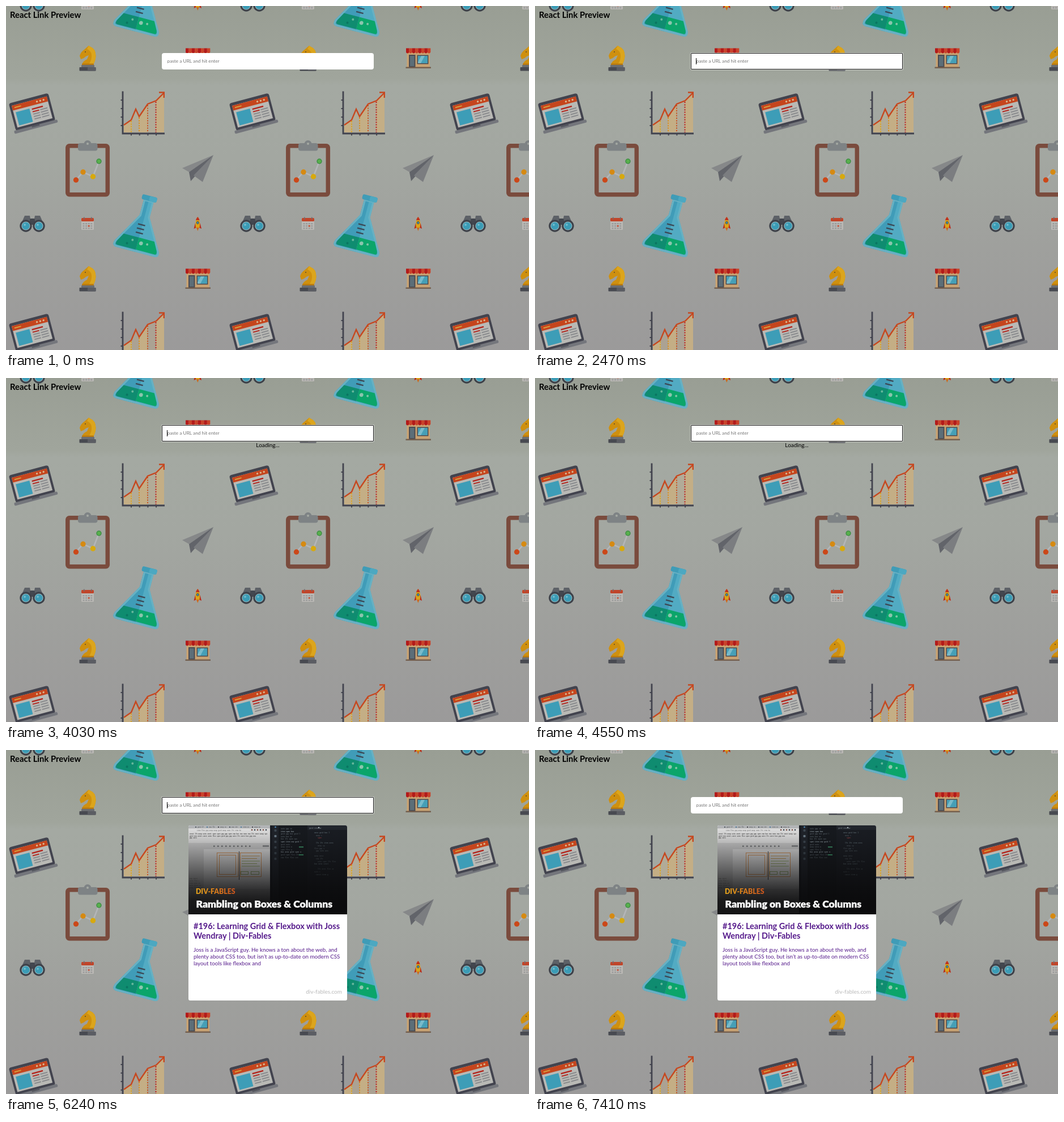
An HTML page with a canvas that plays this animation: 923 by 607 pixels, repeating every 7540 ms.

```html
<!DOCTYPE html>
<html lang="en">
<head>
<meta charset="utf-8">
<title>React Link Preview</title>
<style>
  html, body { margin: 0; width: 100%; height: 100%; overflow: hidden; }
  body { position: relative; background: #a0a49d; font: 10px/1.2 Lato, "Open Sans", sans-serif; color: #000; }
  body *, canvas { position: absolute; margin: 0; white-space: pre; }
  #wall { left: 0; top: 0; }
  h1 { left: 7px; top: 6.5px; font-size: 14.8px; font-weight: 700; }
  #field { left: 275px; top: 83px; width: 374px; height: 29px; background: #fff; border-radius: 4px; }
  #field.focus { border-radius: 1px; outline: 1px solid #161616; outline-offset: -1px; box-shadow: 0 0 0 1px rgba(255, 255, 255, .5); }
  #field span { left: 9.5px; top: 9.9px; font-size: 8.3px; }
  #field.empty span { color: #757575; }
  #caret { top: 9px; width: 1px; height: 11px; background: #000; }
  #loading { left: 275px; width: 374px; top: 111.8px; text-align: center; }
  #card { left: 322px; top: 133px; width: 280px; height: 308.5px; background: #fff; border-radius: 3px; overflow: hidden; }
  #card canvas { left: 0; top: 0; }
  .brand { left: 13px; top: 110px; font-size: 12.3px; font-weight: 900; color: transparent;
    background: linear-gradient(90deg, #e2a21b, #c9531d); -webkit-background-clip: text; background-clip: text; }
  .show { left: 13.5px; top: 127.8px; font-size: 17.6px; font-weight: 900; color: #fff; -webkit-text-stroke: .4px #fff; }
  h2 { left: 9px; top: 168.7px; font-size: 14.5px; line-height: 17.6px; font-weight: 700; color: #551a8b; }
  p { left: 9px; top: 212.7px; font-size: 9.75px; line-height: 12px; color: #551a8b; }
  .site { right: 9px; top: 287.3px; color: #b9b9b9; }
</style>
</head>
<body>
<canvas id="wall" width="923" height="607"></canvas>
<h1>React Link Preview</h1>
<div id="field"><span id="value"></span><i id="caret"></i></div>
<div id="loading">Loading...</div>
<div id="card">
  <canvas id="thumb" width="280" height="157"></canvas>
  <div class="brand">DIV-FABLES</div>
  <div class="show">Rambling on Boxes &amp; Columns</div>
  <h2>#196: Learning Grid &amp; Flexbox with Joss
Wendray | Div-Fables</h2>
  <p>Joss is a JavaScript guy. He knows a ton about the web, and
plenty about CSS too, but isn’t as up-to-date on modern CSS
layout tools like flexbox and</p>
  <div class="site">div-fables.com</div>
</div>
<script>
const $ = id => document.getElementById(id);
const TILE = 389;
let c = $('wall').getContext('2d');

// drawing helpers
function rect(x, y, w, h, color, r = 0) {
  c.fillStyle = color;
  c.beginPath();
  c.roundRect(x, y, w, h, r);
  c.fill();
}
function dot(x, y, r, color) {
  c.fillStyle = color;
  c.beginPath();
  c.arc(x, y, r, 0, Math.PI * 2);
  c.fill();
}
function trace(pts) {
  c.beginPath();
  pts.forEach(([x, y]) => c.lineTo(x, y));
}
function poly(color, ...pts) {
  trace(pts);
  c.fillStyle = color;
  c.fill();
}
function line(color, width, ...pts) {
  trace(pts);
  c.strokeStyle = color;
  c.lineWidth = width;
  c.stroke();
}
function shape(d, color) {
  c.fillStyle = color;
  c.fill(new Path2D(d));
}
function turned(x, y, angle, draw) {
  c.save();
  c.translate(x, y);
  c.rotate(angle);
  draw();
  c.restore();
}

function laptop() {
  turned(46, 187, -0.26, () => {
    rect(-36, -25, 72, 50, '#42434e', 4);
    rect(-39.5, 24, 79, 5.5, '#74767c', 2);
    rect(-7, 24, 14, 2.5, '#54565e');
    rect(-32, -20, 64, 40, '#b9b9b5');
    rect(-32, -20, 64, 9, '#c5451d');
    for (let i = 0; i < 3; i++) dot(13 + i * 6, -15.5, 1.7, '#d8b48c');
    rect(-28, -16.5, 12, 2, '#d8a03c');
    rect(-28, -7, 25, 24, '#3d9db7');
    rect(1, -6, 20, 2.4, '#b32018');
    for (let i = 0; i < 4; i++) {
      rect(1, -1 + i * 4.4, 12, 1.8, i ? '#85878a' : '#b32018');
      rect(15, -1 + i * 4.4, 13, 1.8, '#85878a');
    }
  });
}

function chart() {
  const pts = [[208, 210], [221, 201], [229, 182], [235, 195], [250, 173], [265, 167], [279, 153]];
  c.save();
  trace([...pts, [279, 223], [208, 223]]);
  c.clip();
  rect(208, 150, 72, 74, 'rgba(208,178,128,.3)');
  for (const x of [208, 235, 265]) rect(x, 150, 14, 74, '#c4ae85');
  c.restore();
  c.setLineDash([2, 2.4]);
  [[221, 203, '#d6a31c'], [235, 197, '#d78b1c'], [250, 175, '#cc511c'], [264.5, 169, '#bd1717']]
    .forEach(([x, y, color]) => line(color, 2, [x, y], [x, 223]));
  c.setLineDash([]);
  for (let i = 0; i < 4; i++) {
    rect(202.5, 165 + i * 15, 3, 2, '#42434e');
    rect(220 + i * 14.7, 225, 2, 3.5, '#42434e');
  }
  line('#42434e', 2.8, [206, 150.5], [206, 225], [280, 225]);
  line('#c6471f', 2.4, ...pts);
  line('#c6471f', 2.4, [270, 152.5], [278.8, 152.5], [278.8, 162]);
}

function clipboard() {
  c.strokeStyle = '#7a4b3d';
  c.lineWidth = 7.5;
  c.beginPath();
  c.roundRect(108.8, 246.8, 70.5, 86, 3);
  c.stroke();
  dot(144, 243.5, 6.5, '#7e8385');
  rect(127, 242, 34.5, 13.5, '#7e8385', 4);
  dot(144, 243, 2, '#a4a9a2');
  const pts = [[123.5, 307], [136, 293], [153.5, 301], [164, 274]];
  line('#b4b6b8', 2.6, ...pts);
  ['#cb4819', '#d68a12', '#d7a90e', '#3f8f45'].forEach((color, i) => dot(...pts[i], 4.7, color));
  dot(164, 274, 3.2, '#58b04c');
}

function plane() {
  const tip = [366, 263];
  poly('#868889', tip, [311, 286], [323, 293]);
  poly('#62646a', tip, [323, 293], [326, 309]);
  poly('#4f5158', tip, [326, 309], [334, 300]);
  poly('#7b7d80', tip, [331, 299], [347, 310.5]);
}

function flask() {
  turned(253, 340, 0.26, () => {
    const body = new Path2D('M-9 3V32L-40 86Q-44 97-34 97H34Q44 97 40 86L9 32V3Z');
    c.save();
    c.clip(body);
    rect(-45, 0, 90, 100, '#52abc3');
    rect(-45, 0, 45, 100, '#409cb8');
    c.strokeStyle = '#68b1c3';
    c.lineWidth = 6;
    c.stroke(body);
    c.restore();
    shape('M-28 71H0V93H-34Q-39 93-36 86Z', '#0f8c70');
    shape('M28 71H0V93H34Q39 93 36 86Z', '#0ba56a');
    rect(-13.5, -5, 27, 9, '#3f9cb7', 3);
    rect(0, -5, 13.5, 9, '#4ca8c1', 3);
    for (let i = 0; i < 3; i++) line('#3c4855', 2.4, [-8, 48 + i * 7.5], [5, 48 + i * 7.5]);
    dot(6, 80, 3.4, '#8bc5ae');
    dot(-10, 78, 2, '#67b79c');
    dot(17, 79, 2, '#7fc3a5');
    dot(-18, 86, 2, '#0a7562');
  });
}

function binoculars() {
  poly('#5d6167', [33, 370], [42, 370], [45, 386], [26, 386]);
  poly('#5d6167', [51, 370], [60, 370], [67, 386], [48, 386]);
  rect(42, 375, 9, 11, '#43474f', 2);
  for (const x of [35, 58]) {
    dot(x, 388, 10.7, '#3d4149');
    dot(x, 388, 7.6, '#9dbcc2');
    dot(x, 388, 6.6, '#3b9cb6');
    dot(x - 2, 386, 2, '#6fb9ca');
  }
}

function calendar() {
  rect(133, 374, 22, 21, '#bab8b4', 1.5);
  rect(133, 374, 22, 6, '#c0452a', 1.5);
  for (const x of [137, 150]) rect(x, 372.5, 1.5, 4, '#6c6e73');
  for (let i = 0; i < 12; i++)
    rect(135.5 + i % 4 * 4.6, 383 + (i >> 2) * 4, 3, 2.4, i === 6 ? '#c0452a' : '#999a9a');
}

function rocket() {
  poly('#b92a18', [334, 383], [331.5, 393], [336, 391]);
  poly('#b92a18', [342.5, 383], [345, 393], [340.5, 391]);
  shape('M338.3 372Q344 380 341.5 391H335Q332.5 380 338.3 372Z', '#d8a31b');
  shape('M338.3 372Q341 375 341.6 378H335Q335.5 375 338.3 372Z', '#c2331a');
  dot(338.3, 382.5, 2.4, '#42434e');
  dot(338.3, 382.5, 1.5, '#3d9db7');
  poly('#cf6a18', [336, 391], [340.7, 391], [338.3, 397]);
}

function knight() {
  shape('M134 492Q136 486 143 483L146 476Q141 477 137 481L132 483L130 477Q132 470 138 466L146 459L149 461Q158 464 158.5 477Q158 486 154 492Z', '#cf900f');
  shape('M146 459L149 461Q158 464 158.5 477Q158 486 154 492H146Q152 484 151 475Q150 468 143 465Z', '#dca51c');
  dot(140, 470, 1, '#5b4a28');
  rect(134, 490.5, 21, 3, '#b9790f', 1);
  rect(133, 493, 23, 5, '#6b6d71', 1);
  rect(129.5, 497, 29, 6.5, '#484a51', 1);
  rect(144, 497, 14.5, 6.5, '#5b5d63', 1);
}

function shop() {
  rect(318.5, 470, 40.5, 28, '#c8a272');
  rect(322, 475, 11.5, 22, '#4b4a50');
  rect(324, 477, 7.5, 18, '#5c6e78');
  rect(336.5, 475.5, 20, 16, '#4b4a50');
  rect(338, 477, 17, 13, '#469fb6');
  poly('#79bbca', [344, 477], [350, 477], [343, 490], [338, 490], [338, 488]);
  rect(316.5, 496.5, 44.5, 2.5, '#75604f');
  for (let i = 0; i < 8; i++) {
    const color = i % 2 ? '#c9432a' : '#b31a1a';
    rect(317 + i * 5.4, 463.5, 5.5, 6.5, color);
    dot(319.7 + i * 5.4, 469.8, 2.7, color);
  }
}

function drawWall() {
  const bg = c.createLinearGradient(0, 0, 0, 607);
  [[0, '#999e94'], [.21, '#a0a59c'], [.23, '#a4a9a2'], [.45, '#a3a7a1'], [.7, '#9fa09d'], [1, '#9b9a9a']]
    .forEach(stop => bg.addColorStop(...stop));
  rect(0, 0, 923, 607, bg);
  const icons = [laptop, chart, clipboard, plane, flask, binoculars, calendar, rocket, knight, shop];
  for (let row = -1; row < 2; row++)
    for (let col = 0; col < 3; col++) {
      c.save();
      c.translate(col * TILE, row * TILE);
      icons.forEach(draw => draw());
      c.restore();
    }
}

let seed = 7;
const rand = () => (seed = seed * 16807 % 2147483647) / 2147483647;
const words = 'grid box flex row gap area const auto wrap item span 1fr'.split(' ');

function tiny(x, y, count, color, size = 2.6) {
  c.font = size + 'px "Noto Sans Mono", monospace';
  c.fillStyle = color;
  let text = '';
  while (text.length < count) text += words[rand() * words.length | 0] + ' ';
  c.fillText(text.slice(0, count), x, y);
}

function drawThumb() {
  c = $('thumb').getContext('2d');
  c.translate(-322, -133);
  // browser window
  rect(322, 133, 144, 157, '#cfcfcf');
  rect(322, 133, 144, 5.5, '#b4b6b8');
  for (let i = 0; i < 6; i++) {
    dot(335 + i * 20, 136, 1.1, ['#3c4650', '#356c95', '#34353a'][i % 3]);
    tiny(338 + i * 20, 137, 7, '#4b4d50');
  }
  rect(322, 138.5, 144, 5.5, '#e2e2e2');
  tiny(337, 142.5, 50, '#666');
  for (let i = 0; i < 6; i++) dot(434 + i * 5, 141, 1.3, i % 2 ? '#34404c' : '#7a4a3f');
  rect(322, 144, 144, 20, '#e2e2e2');
  tiny(324, 149, 88, '#1c1c1c');
  tiny(324, 152.5, 76, '#1c1c1c');
  tiny(324, 156, 8, '#222');
  // sketch window
  rect(349, 165, 117, 80, '#e3e3e3');
  rect(349, 165, 117, 10, '#cecece');
  for (let i = 0; i < 10; i++) rect(366 + i * 7, 168.5, 2.5, 2.5, '#77797b');
  rect(453, 168, 11, 3, '#8a8c8e');
  c.strokeStyle = '#d78336';
  c.lineWidth = .8;
  c.strokeRect(372.5, 181.5, 37, 42);
  c.strokeRect(376.5, 185.5, 29, 34);
  c.strokeRect(413.5, 181.5, 37, 42);
  for (let i = 0; i < 5; i++)
    line(i < 2 ? '#c7913c' : '#8aa34e', .8, [416, 187 + i * 4.5], [448 - i % 2 * 5, 187 + i * 4.5]);
  c.strokeStyle = '#7f9c4c';
  c.strokeRect(414.5, 214.5, 13, 5);
  c.strokeRect(432.5, 214.5, 14, 5);
  line('#404040', 1, [411.5, 179], [411.5, 229]);
  for (let i = 0; i < 5; i++) tiny(324, 228 + i * 4, 10 + i, '#777');
  // code editor
  rect(466, 133, 136, 157, '#1a1d23');
  rect(470, 133, 11, 157, '#20242b');
  rect(481, 133, 51, 157, '#171a1f');
  rect(532, 133, 70, 8, '#22262d');
  for (let i = 0; i < 6; i++) rect(473.5, 140 + i * 10, 4, 4, i === 1 ? '#6d7c88' : '#3e4852', 1);
  dot(475.5, 136, 1.5, '#4b7fa5');
  for (let i = 0; i < 12; i++) {
    tiny(485, 140 + i * 4.6, 8 + rand() * 14 | 0, i % 4 === 1 ? '#b4c4cc' : '#6c777f', 3);
    if (i === 7 || i === 10) rect(517, 138 + i * 4.6, 8, 2, '#3c9468');
  }
  tiny(535, 139, 12, '#8d999f', 3);
  dot(552, 137, 1.2, '#a5b0b5');
  for (let i = 0; i < 17; i++) {
    if (i % 5 === 3) continue;
    tiny(544 + i % 3 * 3, 147 + i * 4.6, 4 + rand() * 16 | 0, i === 2 ? '#b24a4a' : i % 4 ? '#5c676e' : '#72848c', 3);
  }
  // darkening towards the caption
  const fade = c.createLinearGradient(0, 133, 0, 290);
  [[0, 0], [.12, .1], [.3, .32], [.5, .56], [.7, .8], [.85, .92], [1, .95]]
    .forEach(([at, alpha]) => fade.addColorStop(at, `rgba(10,10,11,${alpha})`));
  rect(322, 133, 280, 157, fade);
}

drawWall();
drawThumb();

// timeline, ms
const LOOP = 7540, FOCUS = 1300, PASTE = 2600, ENTER = 4030, CARD = 5200, BLUR = 7410;
const caretOn = [[1300, 1820], [2470, 3120], [3640, 4550], [5200, 5720], [6240, 6760]];
const hint = 'paste a URL and hit enter';
const url = 'https://div-fables.com/video-screencasts/196-learning-grid-flexbox-with-joss-wendray/';
const between = (t, a, b) => t >= a && t < b;
const show = (id, on) => $(id).style.visibility = on ? 'visible' : 'hidden';

function frame(now) {
  const t = now % LOOP;
  const filled = between(t, PASTE, ENTER);
  const value = $('value');
  value.textContent = filled ? url : hint;
  $('field').className = (between(t, FOCUS, BLUR) ? 'focus ' : '') + (filled ? '' : 'empty');
  $('caret').style.left = 9 + (filled ? value.offsetWidth : 0) + 'px';
  show('caret', caretOn.some(([a, b]) => between(t, a, b)));
  show('loading', between(t, ENTER, CARD));
  show('card', t >= CARD);
  requestAnimationFrame(frame);
}
frame(performance.now());
</script>
</body>
</html>
```
